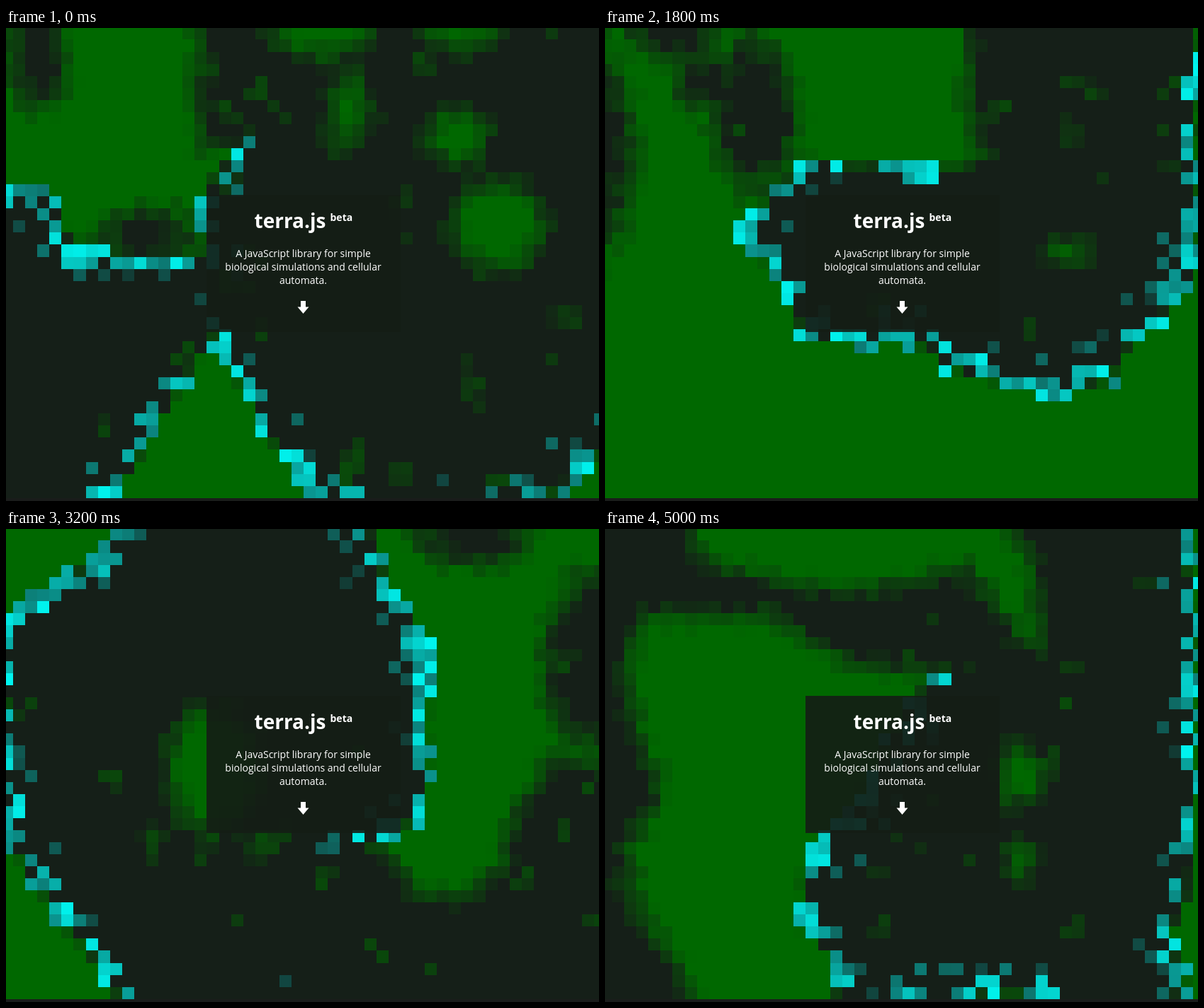
An HTML page with a canvas for the animation above (5200 ms loop, 837 px wide and 669 px high).

```html
<!DOCTYPE html>
<html lang="en">
<head>
<meta charset="utf-8">
<title>terra.js</title>
<style>
  html, body { margin: 0; width: 100%; height: 100%; overflow: hidden; background: #151f18; }
  canvas { display: block; }
</style>
</head>
<body>
<canvas id="stage" width="837" height="669"></canvas>
<script>
const ctx = document.getElementById('stage').getContext('2d');
const COLS = 50, ROWS = 39, STEP = 200, LOOP = 5200, FAR = 8;
const SOIL = '#151f18', FONT = '"Open Sans", "Noto Sans", sans-serif';
const edgeX = c => Math.round(c * 17.09 - 7.1);
const edgeY = r => Math.max(0, Math.round(r * 17.06 - 0.6));
const clamp = (v, lo, hi) => Math.max(lo, Math.min(hi, v));
const mix = (a, b, u) => a + (b - a) * u;

// Repeatable random number in 0..1
function rand(a, b, c) {
  let h = Math.imul(a + 101, 374761393) ^ Math.imul(b + 57, 668265263) ^ Math.imul(c + 13, 1274126177);
  h = Math.imul(h ^ (h >>> 13), 1103515245);
  return ((h ^ (h >>> 16)) >>> 0) / 4294967296;
}

// Signed distance to a polygon in cells, positive inside
function depth(p, x, y) {
  let best = Infinity, inside = false;
  for (let i = 0, j = p.length - 2; i < p.length; j = i, i += 2) {
    const ex = p[j] - p[i], ey = p[j + 1] - p[i + 1], wx = x - p[i], wy = y - p[i + 1];
    const k = clamp((wx * ex + wy * ey) / (ex * ex + ey * ey || 1), 0, 1);
    best = Math.min(best, Math.hypot(wx - ex * k, wy - ey * k));
    if ((p[i + 1] > y) !== (p[j + 1] > y) && x < ex * (y - p[i + 1]) / ey + p[i]) inside = !inside;
  }
  return inside ? best : -best;
}

const patch = (...p) => (x, y) => depth(p, x, y);
const blob = (cx, cy, rx, ry) => (x, y) =>
  (1 - Math.hypot((x - cx) / rx, (y - cy) / ry)) * Math.min(rx, ry);

// bare: ground without plants; herd: ground the eaters have cleared; regrowth: young plants on it
const scenes = [
  { time: 0,
    bare: [patch(17.5,-5, 55,-5, 55,14, 30,14, 20,8, 17.5,9), blob(3, 2.5, 1.2, 2), blob(12, 17.2, 1.7, 1)],
    herd: patch(-5,14, 4,14, 6,19, 17,19, 17,14, 20,9, 55,9, 55,30, 46,38, 40,41, 26,39, 22,33, 17.5,25, 13,32, 9,39, -5,44),
    regrowth: [blob(26.5, 0, 5.5, 3.5), blob(28.7, 7, 2.8, 4.5), blob(38, 0, 4.5, 3), blob(37.7, 9, 3.5, 3.3),
      blob(41, 16.5, 4.8, 4.7), blob(47, 24, 1.6, 1.3), blob(39, 29.5, 1.2, 2.8)] },
  { time: 1000,
    bare: [patch(13,-5, 30,-5, 33,20, 17,19, 11,18, 10,15, 4,15, 3,19, -5,21, -5,4, 13,4), blob(20.5, 37.5, 3.5, 3.5),
      blob(11.5, 33, 1.3, 1.3), blob(18, 27, 0.7, 0.7), blob(32, 26, 1, 1.4), blob(30.5, 34.5, 0.5, 0.5),
      blob(50, 8, 2, 1.4), blob(47.5, 29.5, 2, 0.5)],
    herd: patch(36.5,-5, 38,4, 37,10, 39,18, 35,20.5, 28,19, 6,12, -5,10, -5,0.5, 13,0.5, 13,-5),
    regrowth: [blob(22.5, 9.2, 4, 3.4)] },
  { time: 1800,
    bare: [patch(31.5,-5, 40,-5, 40,18, 27,14, 33,11, 31.5,6), blob(12.7, 7, 2.3, 4), blob(6, 0, 2, 1.5),
      blob(8.5, 4.5, 1, 1), blob(0, 10, 1.5, 4)],
    herd: patch(49,-5, 49,20, 46,24, 43.5,26, 42,29, 37,30, 29,28, 27,26, 17,25.5, 16,22, 12,17, 17,11, 26,12, 33,13, 34,-5),
    regrowth: [blob(38.5, 18.5, 3, 1.8), blob(39, 8.7, 1.6, 1.3), blob(41, 5.7, 1.2, 1.2)] },
  { time: 2400,
    bare: [patch(44,4, 55,3, 55,30, 33,28, 33,25, 41,23, 43,18), patch(34.5,-5, 43,-5, 50,4, 44,6, 36,4), blob(40, 12.7, 3.5, 0.8)],
    herd: patch(16,5, 23,5, 28,8, 29,13, 33,16, 33,24, 55,26, 48,32, 45,37.5, 36,38, 31,37, 28,34, 20,33.5, 13,32, 9,28, 6,20, 5,16, 7,10, 12,8),
    regrowth: [blob(45.5, 0.5, 2.5, 2)] },
  { time: 3200,
    bare: [patch(30,27, 34,31, 38,32, 42,29, 44,23, 46,20.5, 55,21, 55,44, 24,44, 25,28), blob(39, 0.5, 2.3, 1.3), blob(49, 11, 3, 5)],
    herd: patch(11,-5, 9,2, 4,5, 0,8, 0,20, 1,26, 5,32, 9,37, 12,44, 26,44, 26,34, 30,26, 34,24, 35,20, 35,10, 31,3, 29,-5),
    regrowth: [blob(17.5, 20, 4.8, 6.5), blob(22, 26, 3, 1.6), blob(12.5, 26, 1.5, 1.8)] },
  { time: 4000,
    bare: [patch(-5,-5, 22,-5, 22,27, 25,31, 28,44, -5,44), patch(55,23, 47,23.5, 44,31, 41,34, 36.5,34.5, 36.5,44, 55,44)],
    herd: patch(38.5,-5, 39,4, 41,7, 42,16, 41,26, 38,29, 31,30.5, 25,28, 20,12, 20,-5),
    regrowth: [patch(8,17, 12,14, 26,13, 26,28.5, 12,29, 12,24, 8,21), blob(11, 10, 2.2, 3), blob(6.5, 14.5, 3, 2.4),
      blob(7, 27, 2.4, 3), blob(8.5, 32.5, 2.8, 1.8), blob(18.5, 0.5, 4.5, 2.2), blob(15.5, 34, 1.7, 1.3)] },
  { time: 5000,
    bare: [patch(-5,-5, 40,-5, 40,13, 28,11, 22,10.5, 14,6, 3,6, 0.5,12, 2,17, 4,22, 1,26, 2,32, 6,38, 8,44, -5,44)],
    herd: patch(48.5,-5, 49,10, 48.5,30, 46.5,34, 48,37, 47,44, 40,44, 38,37.5, 29,39, 20,40, 19,35, 17,33, 17,28, 20,25, 27,13, 33,11, 33,-5),
    regrowth: [patch(3.5,-5, 33,-5, 37,3, 37.5,11, 34,10, 30,4.5, 20,6.5, 8,4), blob(34.7, 20.5, 3, 3.4), blob(34.7, 27.5, 2, 2.4)] }
];

const SOFT = 2.2;
const reach = (shapes, x, y) => shapes.reduce((d, shape) => Math.max(d, shape(x, y)), -FAR);
for (const s of scenes) {
  s.cells = [];
  for (let r = 0; r < ROWS; r++)
    for (let c = 0; c < COLS; c++) {
      const x = c + 0.5, y = r + 0.5;
      s.cells.push([-reach(s.bare, x, y), s.herd(x, y), reach(s.regrowth, x, y)].map(d => clamp(d, -FAR, FAR)));
    }
}

function paint(c, r, rgb, alpha) {
  const x = edgeX(c), y = edgeY(r);
  ctx.fillStyle = `rgba(${rgb},${alpha})`;
  ctx.fillRect(x, y, edgeX(c + 1) - x, edgeY(r + 1) - y);
}
const plant = (c, r, alpha) => paint(c, r, '0,104,0', alpha);
const eater = (c, r, alpha) => paint(c, r, '0,245,240', alpha);

function drawCell(c, r, step, old, herd, young) {
  const chance = rand(c, r, step), shade = rand(r, c, step + 40);
  const food = old / SOFT;
  if (food > 0.4 && herd > -0.8 && herd < 1.1 && chance < 0.55) return eater(c, r, 0.4 + 0.6 * shade);
  if (food > 0.4 && herd > 1 && herd < 3 && chance < 0.14) return eater(c, r, 0.12 + 0.3 * shade);
  const life = Math.max(Math.min(food, -herd / 0.6), young / SOFT);
  const level = life + (shade - 0.5) * 0.45;
  if (level > 0.1) plant(c, r, Math.min(1, level));
  else if (rand(c >> 1, r >> 1, step + 80) < 0.06 && chance > 0.5) plant(c, r, 0.2 + 0.4 * shade);
}

function drawWorld(step) {
  const t = step * STEP;
  const i = scenes.findLastIndex(s => s.time <= t);
  const a = scenes[i], b = scenes[i + 1] || a;
  const u = a === b ? 0 : (t - a.time) / (b.time - a.time);
  a.cells.forEach((from, n) => {
    const now = from.map((d, k) => mix(d, b.cells[n][k], u));
    drawCell(n % COLS, Math.floor(n / COLS), step, ...now);
  });
}

function text(str, x, y, font, align) {
  ctx.font = font + ' ' + FONT;
  ctx.textAlign = align;
  ctx.fillText(str, x, y);
}

function drawPanel() {
  ctx.fillStyle = 'rgba(20,29,22,0.9)';
  ctx.fillRect(283, 236, 274, 194);
  ctx.fillStyle = '#fff';
  text('terra.js', 350.5, 283, 'bold 28px', 'left');
  text('beta', 457.5, 273, 'bold 14px', 'left');
  ['A JavaScript library for simple', 'biological simulations and cellular', 'automata.']
    .forEach((line, i) => text(line, 419.5, 324 + i * 19, '14px', 'center'));
  ctx.fillRect(416, 386, 7, 9);
  ctx.beginPath();
  ctx.moveTo(411.5, 394.5);
  ctx.lineTo(427.5, 394.5);
  ctx.lineTo(419.5, 404);
  ctx.fill();
}

let shown = -1;
function frame(now) {
  const step = Math.floor((now % LOOP) / STEP);
  if (step !== shown) {
    shown = step;
    ctx.fillStyle = SOIL;
    ctx.fillRect(0, 0, 837, 669);
    drawWorld(step);
    ctx.fillStyle = '#1a1c1b';
    ctx.fillRect(0, 665, 837, 4);
    drawPanel();
  }
  requestAnimationFrame(frame);
}
frame(performance.now());
</script>
</body>
</html>
```
